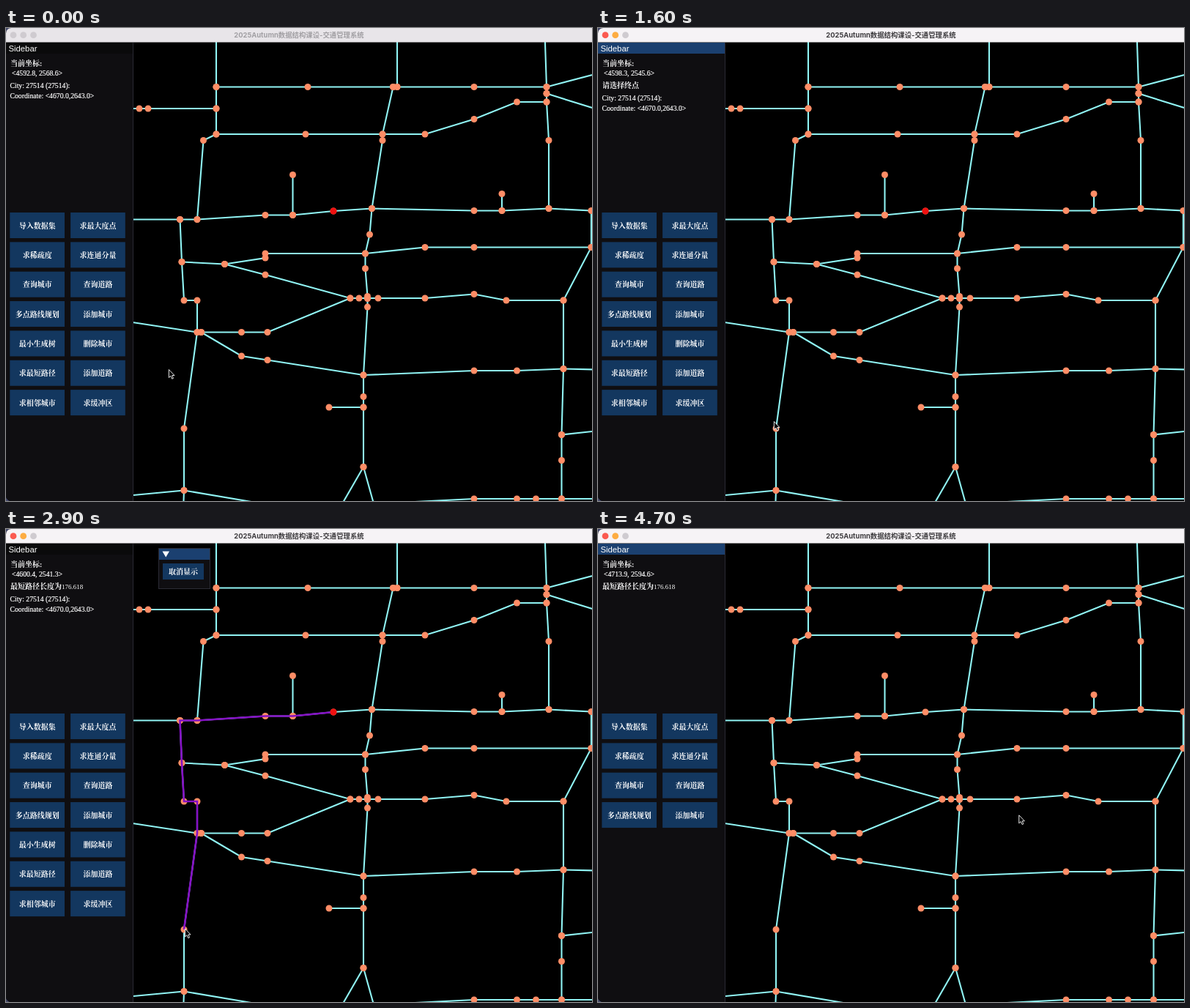
Animation of 800 by 646 pixels, one loop 4800 ms. Source, as an HTML page:

```html
<!DOCTYPE html>
<html lang="zh">
<head>
<meta charset="utf-8">
<style>
  html, body { margin: 0; width: 100%; height: 100%; overflow: hidden; background: #454a6c; }
  svg { display: block; border-radius: 7px 0 0 7px; background: #000; }
  text { fill: #fff; font: 9.7px "Liberation Serif", "Noto Serif CJK SC", "Noto Sans CJK SC", serif; }
  .latin { stroke: #fff; stroke-width: .2px; }
  .zh { font-size: 10px; font-weight: bold; }
  .button text { text-anchor: middle; }
  .button rect { fill: #13375f; }
  .button.hover rect { fill: #0583f7; }
  #title { font: bold 9.4px Inter, "Noto Sans CJK SC", sans-serif; text-anchor: middle; }
  #roads path { fill: none; }
</style>
</head>
<body>
<svg width="800" height="646" viewBox="0 0 800 646">
  <defs>
    <marker id="node" markerUnits="userSpaceOnUse" markerWidth="10" markerHeight="10" refX="5" refY="5">
      <circle cx="5" cy="5" r="4.5" fill="#ff8d66"/>
    </marker>
    <g id="roads">
      <path d="M287 0V80.5V110V145L269.5 153.5L261 261.5"/>
      <path d="M287 80.5H412H528.5H534H639H738L840 53.5"/>
      <path d="M160 110H182H194H287"/>
      <path d="M534 0V80.5"/>
      <path d="M528.5 80.5L514 145V153.5L499.5 246.5L496.5 282L490.5 308V328.5L493.5 366.5V369.5V381L488 474V503.5V518V599.5L456 655"/>
      <path d="M488 599.5L503.5 655"/>
      <path d="M287 145H409H514H572L639 124.5L697.5 101H738"/>
      <path d="M735.3 0L738 80.5V89.5V101L741 153.5V246.5"/>
      <path d="M738 89.5L832 119"/>
      <path d="M150 261.5H237.5H261L354 255.5H391.5L447 250L499.5 246.5L639 249.5H677L741 246.5L799 249.5V299.5L761 372V465.5L758.5 555.5V590.5V643"/>
      <path d="M391.5 200.5V255.5"/>
      <path d="M677 226.5V249.5"/>
      <path d="M237.5 261.5L240 319.5L243 372H261V415.5L243 547V631.5L242 660"/>
      <path d="M240 319.5L298.5 322.5L354 314V308H490.5L572 299.5H639H799"/>
      <path d="M298.5 322.5L354 337L470 369H482H493.5H508H572L639 363.5L683 372H761"/>
      <path d="M150 398.5L261 415.5H266.5H321.5H357L470 369"/>
      <path d="M266.5 415.5L321.5 448L357 453.5L488 474L639 468H697.5L761 465.5L840 467.2"/>
      <path d="M441 518H488"/>
      <path d="M150 640.3L243 631.5L370 653"/>
      <path d="M450 652.5L639 643H697.5H723.5H758.5H840"/>
      <path d="M758.5 555.5L840 546.7"/>
    </g>
  </defs>

  <use href="#roads" stroke="#90f4f4" stroke-width="2.1"/>
  <use href="#roads" style="marker: url(#node)"/>
  <path id="route" d="M243 547L261 415.5V372H243L240 319.5L237.5 261.5H261L354 255.5H391.5L447 250" fill="none" stroke="#8510c4" stroke-width="2.6"/>
  <circle id="picked" cx="447" cy="250" r="4.5" fill="#f01010"/>

  <g id="popup">
    <rect x="208.5" y="26.5" width="70" height="55" fill="#0f0e11" stroke="#2c2c36"/>
    <rect x="209" y="27" width="69" height="15" fill="#1b4070"/>
    <path d="M213.5 30.5H223L218.2 38.5Z" fill="#fff"/>
  </g>

  <rect y="20" width="174" height="626" fill="#0f0e11"/>
  <rect id="strip" y="20" width="174" height="15"/>
  <path d="M173.5 20V646" stroke="#2a2a33"/>
  <text x="3.5" y="31.5" style="font: 11.3px 'Liberation Sans', sans-serif">Sidebar</text>
  <text class="zh" x="6" y="51.5">当前坐标:</text>
  <text class="latin" id="coords" x="8" y="65"></text>
  <text class="zh" x="6" y="82"><tspan id="message"></tspan><tspan id="distance" font-size="9" style="font-weight: normal"></tspan></text>
  <g id="city" class="latin">
    <text x="5.5" y="82">City: 27514 (27514):</text>
    <text x="5.5" y="96">Coordinate: &lt;4670.0,2643.0&gt;</text>
  </g>
  <g id="menu"></g>

  <rect id="bar" width="800" height="19.5"/>
  <circle class="light" cx="10" cy="9.7" r="4.4"/>
  <circle class="light" cx="23.7" cy="9.7" r="4.4"/>
  <circle class="light" cx="37.5" cy="9.7" r="4.4"/>
  <text id="title" x="400" y="13">2025Autumn数据结构课设-交通管理系统</text>

  <circle id="ring" r="11.5" fill="none" stroke="#e01c1c" stroke-width="2.6" stroke-dasharray="2.4 .5"/>
  <path id="cursor" d="M0 0V11L2.5 8.7L4.3 12.7L6.1 11.9L4.4 8H7.6Z" fill="#000" stroke="#fff" stroke-width=".9"/>
</svg>
<script>
const LOOP = 4800, STEP = 100, LAG = 50, SCALE = 2.91;
const $ = id => document.getElementById(id);
const show = (id, on) => $(id).style.display = on ? "" : "none";

// Pointer path: time, map x, map y
const keys = [
  [100, 4592.8, 2568.6], [500, 4533.7, 2566.4], [850, 4533.7, 2566.4],
  [1150, 4591.6, 2557.4], [1200, 4593.7, 2555.5], [1700, 4600.3, 2541.4],
  [2400, 4600.3, 2541.4], [2500, 4600.4, 2541.3], [3200, 4600.4, 2541.3],
  [3750, 4601.2, 2711.4], [3800, 4599.9, 2715.5], [4000, 4599.9, 2709.3],
  [4250, 4599.9, 2709.3], [4550, 4713.9, 2594.6]
];

function pointer(t) {
  const i = keys.findIndex(k => k[0] >= t);
  if (i < 0) return keys.at(-1).slice(1);
  if (!i) return keys[0].slice(1);
  const a = keys[i - 1], b = keys[i], p = (t - a[0]) / (b[0] - a[0]);
  return [1, 2].map(n => a[n] + (b[n] - a[n]) * p);
}

const toStage = ([x, y]) => [447 + (x - 4670) * SCALE, 250 - (y - 2643) * SCALE];

const buttons = [];
function addButton(parent, label, x, y, w, h) {
  const g = document.createElementNS("http://www.w3.org/2000/svg", "g");
  g.setAttribute("class", "button");
  g.innerHTML = `<rect x="${x}" y="${y}" width="${w}" height="${h}"/>
    <text class="zh" x="${x + w / 2}" y="${y + h / 2 + 4}">${label}</text>`;
  $(parent).append(g);
  buttons.push({ g, x, y, w, h });
  return g;
}

const labels = "导入数据集 求最大度点 求稀疏度 求连通分量 查询城市 查询道路 多点路线规划 添加城市 最小生成树 删除城市 求最短路径 添加道路 求相邻城市 求缓冲区".split(" ");
const cityButtons = labels
  .map((label, i) => addButton("menu", label, 5.3 + i % 2 * 82.8, 252 + (i >> 1) * 40.35, 74.7, 35))
  .slice(8);
addButton("popup", "取消显示", 214, 47, 56, 22);

function draw(t) {
  const active = t >= 600, asking = t >= 800 && t < 2500;
  const found = t >= 2500 && t < 4300, selected = t < 4300;
  const seen = pointer(t - LAG), [sx, sy] = toStage(seen), [x, y] = toStage(pointer(t));

  $("bar").setAttribute("fill", active ? "#f6f3f6" : "#e8e5e9");
  $("title").style.fill = active ? "#3d3b3e" : "#a19fa3";
  const lights = active ? ["#fb5a50", "#fdac42", "#cfcbd0"] : Array(3).fill("#cfcbd0");
  document.querySelectorAll(".light").forEach((c, i) => c.setAttribute("fill", lights[i]));

  $("strip").setAttribute("fill", asking || !selected ? "#1b4070" : "#0a0a0b");
  $("coords").textContent = `<${seen.map(v => v.toFixed(1)).join(", ")}>`;
  $("message").textContent = t < 800 ? "" : asking ? "请选择终点" : "最短路径长度为";
  $("distance").textContent = t >= 2500 ? "176.618" : "";
  $("city").setAttribute("transform", `translate(0 ${t < 800 ? 0 : 16.7})`);
  show("city", selected);
  show("picked", selected);
  show("route", found);
  show("popup", found);
  cityButtons.forEach(g => g.style.display = selected ? "" : "none");
  for (const b of buttons)
    b.g.classList.toggle("hover", sx > b.x && sx < b.x + b.w && sy > b.y && sy < b.y + b.h);

  show("ring", [600, 700, 2400, 4200].includes(t));
  $("ring").setAttribute("transform", `translate(${x} ${y})`);
  $("cursor").setAttribute("transform", `translate(${x} ${y})`);
}

const start = performance.now();
function tick() {
  const t = (performance.now() - start) % LOOP;
  draw(Math.floor(t / STEP) * STEP);
  requestAnimationFrame(tick);
}
tick();
</script>
</body>
</html>
```
